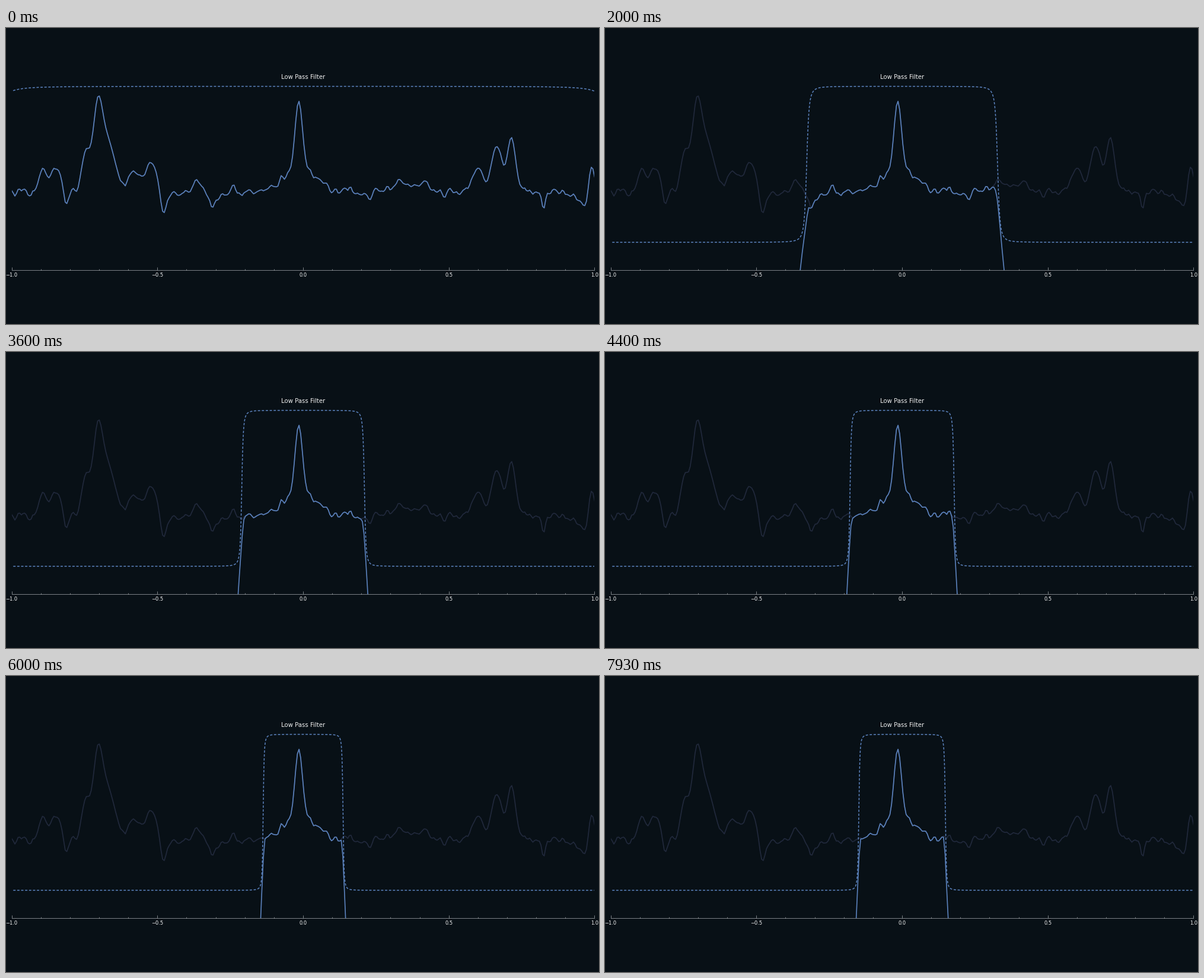
Recreate the animation shown at these times as a matplotlib script. Size 1000x500 px, loop 8000 ms.

```python
import numpy as np
import matplotlib.pyplot as plt
from matplotlib.animation import FuncAnimation
from matplotlib.ticker import MultipleLocator

FRAMES = 120
LOOP_MS = 8000
TURN = 100                      # frame at which the band is narrowest

BG = "#081016"
BLUE = "#5b82bd"
DIM = "#21293c"
INK = "#f2f2f2"
AXIS = "#b4b8bc"

# Plot heights are stage pixels measured from the top.
TOP, BASE = 90, 409.4
PASS_Y, STOP_Y = 98.5, 362
FLOOR_Y = 277

# Peaks and notches of the spectrum: frequency, height, width
BUMPS = [
    (-0.895, 34, 0.012), (-0.85, 38, 0.020), (-0.815, -26, 0.007),
    (-0.745, 65, 0.014), (-0.705, 127, 0.016), (-0.67, 85, 0.025),
    (-0.585, 36, 0.015), (-0.525, 50, 0.020), (-0.48, -38, 0.010),
    (-0.365, 22, 0.012), (-0.31, -16, 0.012), (-0.01, 40, 0.055),
    (-0.015, 114, 0.0125), (0.34, 18, 0.030), (0.415, 20, 0.020),
    (0.60, 38, 0.022), (0.665, 76, 0.018), (0.715, 90, 0.014),
    (0.825, -28, 0.006), (0.965, -24, 0.015), (0.99, 46, 0.010),
]


def make_spectrum(points=360):
    """Gaussian bumps on a noisy floor; the noise calms down on the peaks."""
    freq = np.linspace(-1, 1, points)
    height = sum(h * np.exp(-0.5 * ((freq - f) / w) ** 2) for f, h, w in BUMPS)
    noise = np.random.default_rng(4).normal(0, 7, points)
    noise = np.convolve(noise, [0.3, 0.5, 0.3], "same")
    return freq, FLOOR_Y - height + noise * np.exp(-np.abs(height) / 60)


def cutoff(frame):
    """The band narrows as 1/n, then widens again."""
    step = TURN - abs(frame - TURN)
    return 1 / (0.93 + 0.0708 * step)


def response(freq, fc):
    u = 1 - np.abs(freq) / fc
    gain = 0.5 * (1 + u / np.hypot(u, 0.026))
    return STOP_Y + (PASS_Y - STOP_Y) * gain


def attenuation(freq, fc):
    """Flat in the band, a steady slope beyond it, with a soft knee."""
    u = np.abs(freq) / fc - 1
    knee = 0.01
    return 1590 * knee * np.logaddexp(0, (u + 0.0226) / knee)


freq, spectrum = make_spectrum()
curve_x = np.linspace(-1, 1, 1500)

fig = plt.figure(figsize=(10, 5), dpi=100, facecolor=BG)
ax = fig.add_axes([0.0095, 1 - BASE / 500, 0.983, (BASE - TOP) / 500],
                  facecolor=BG)
ax.set_xlim(-1, 1)
ax.set_ylim(BASE, TOP)
ax.set_yticks([])
for side in ("left", "right", "top"):
    ax.spines[side].set_visible(False)
ax.spines["bottom"].set(color=AXIS, linewidth=0.48)

ax.xaxis.set_major_locator(MultipleLocator(0.5))
ax.xaxis.set_minor_locator(MultipleLocator(0.1))
ax.xaxis.set_major_formatter("{x:.1f}")
ax.tick_params(axis="x", which="both", direction="in", color=AXIS, width=0.48)
ax.tick_params(axis="x", which="major", length=3.4, pad=2.4,
               labelsize=6, labelcolor=INK, labelfontfamily="DejaVu Sans")
ax.tick_params(axis="x", which="minor", length=1.6)
ax.set_title("Low Pass Filter", fontsize=7.3, color=INK, pad=2.9,
             fontfamily="DejaVu Sans")

ax.plot(freq, spectrum, color=DIM, lw=1.2)
filtered, = ax.plot([], [], color=BLUE, lw=1.2)
shape, = ax.plot([], [], color=BLUE, lw=1.1, dash_capstyle="butt",
                 linestyle=(2.6, (2.6, 1.75)))


def draw(frame):
    fc = cutoff(frame)
    filtered.set_data(freq, spectrum + attenuation(freq, fc))
    shape.set_data(curve_x, response(curve_x, fc))
    return filtered, shape


anim = FuncAnimation(fig, draw, frames=FRAMES, interval=LOOP_MS / FRAMES,
                     repeat=True, repeat_delay=0, blit=False)
plt.show()
```
